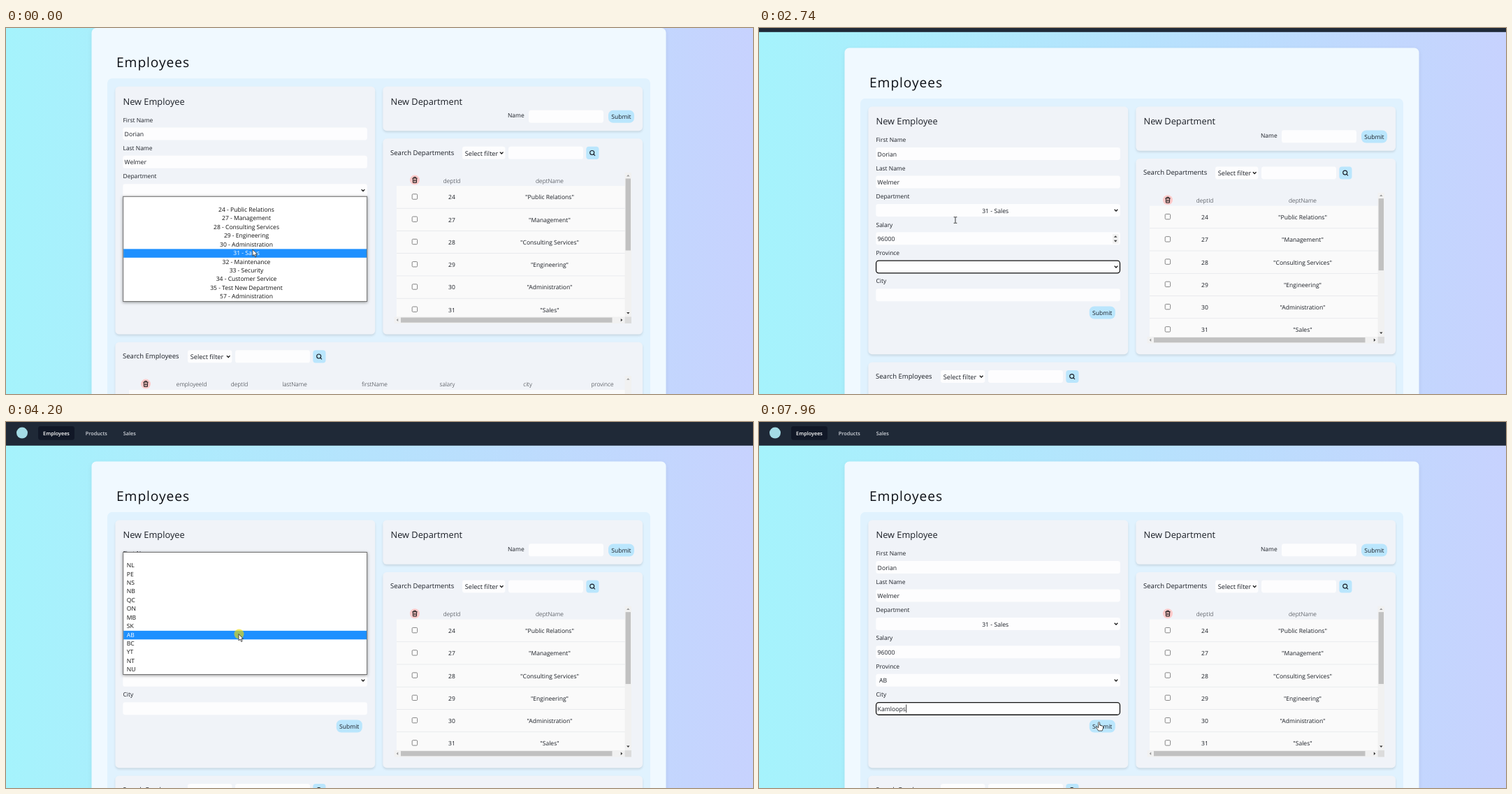
These frames come from a looping animation (1069 px wide and 524 px high, 8000 ms). An HTML page:

```html
<!DOCTYPE html>
<html lang="en">
<head>
<meta charset="utf-8">
<title>Employees</title>
<style>
html, body { margin: 0; width: 100%; height: 100%; overflow: hidden; }
svg { display: block; width: 100%; height: 100%; }
text { font: 8.45px "Open Sans", "Noto Sans", sans-serif; fill: #1b1f26; text-rendering: geometricPrecision; white-space: pre; }
.title { font-size: 19.2px; letter-spacing: .93px; fill: #0c0f14; }
.head { font-size: 12.8px; }
.search { font-size: 9.55px; }
.filter { font-size: 9.2px; }
.value { font-size: 8.7px; }
.cell { font-size: 8.55px; }
.col { font-size: 8.4px; font-weight: 300; }
.nav { font-size: 7.3px; font-weight: 600; fill: #d1d5db; }
.on { fill: #fff; }
.mid { text-anchor: middle; }
.panel { fill: #f0f3f8; filter: drop-shadow(0 2px 1.8px #0000001c); }
.box { fill: #fdfdfe; }
.btn { fill: #bae6fd; }
.popup { filter: drop-shadow(0 1.5px 2px #0006); }
.line { fill: none; stroke: #111; stroke-width: 1.3; }
</style>
</head>
<body>
<svg viewBox="0 0 1069 524">
  <defs>
    <linearGradient id="sky"><stop stop-color="#a5f3fc"/><stop offset="1" stop-color="#c7d2fe"/></linearGradient>
  </defs>
  <rect width="1069" height="524" fill="url(#sky)"/>
  <g id="page">
    <g id="base"></g>
    <g id="spin">
      <rect x="506" y="266.5" width="8.5" height="13.5" fill="#f0f0f0"/>
      <path d="M507.8 271.2l2.4-2.6 2.4 2.6zM507.8 275.2l2.4 2.6 2.4-2.6z" fill="#444"/>
    </g>
    <g id="values"></g>
    <rect id="ring" class="line" x="167.6" width="348.9" height="17.6" rx="3.8"/>
    <rect id="caret" width=".8" height="11.5" fill="#111"/>
  </g>
  <g id="depts" class="popup"></g>
  <g id="provs" class="popup"></g>
  <circle id="press" r="7" fill="#f0dc00" opacity=".64"/>
  <g id="pointer">
    <path id="arrow" d="M0 0V9.4L2.1 7.5 3.7 11 5.2 10.3 3.7 7H6.5Z" fill="#fff" stroke="#222" stroke-width=".8"/>
    <path id="beam" d="M-2.3 -4.3H-.6L0 -3.8.6 -4.3H2.3M0 -3.8V3.8M-2.3 4.3H-.6L0 3.8.6 4.3H2.3" fill="none" stroke="#222" stroke-width=".9"/>
    <path id="hand" d="M-1 .8Q0 -.6 1 .8V4.6L4.8 5.6Q6 6 6 7.4 5.8 10 4.6 12.6H-.8Q-2 10.4 -4 8.2 -4.6 6.6 -3 6.8L-1 8.4Z" fill="#fff" stroke="#222" stroke-width=".8" stroke-linejoin="round"/>
  </g>
</svg>
<script>
const LOOP = 8000, SCROLL = 56.6, ROW = 40.45, ITEM = 12.43;
const $ = id => document.getElementById(id);
const fieldY = i => 151.4 + i * ROW;

const rect = (x, y, w, h, r = 0, attrs = '') =>
  `<rect x="${x}" y="${y}" width="${w}" height="${h}" rx="${r}" ${attrs}/>`;
// y is the middle of the capitals
const text = (x, y, s, cls = '', size = 8.5) =>
  `<text x="${x}" y="${y + size * .37}" class="${cls}">${s}</text>`;
const box = (x, y, w, h = 18) => rect(x, y - h / 2, w, h, 3.4, 'class="box"');
const chevron = (x, y) => `<path class="line" d="M${x - 2.3} ${y - 1.2}l2.3 2.4 2.3-2.4"/>`;
const button = (x, y, s) => rect(x, y - 9, 37, 18, 6.8, 'class="btn"') + text(x + 18.4, y, s, 'mid cell');
const panel = (x, y, w, h) => rect(x, y, w, h, 5.6, 'class="panel"');
const triangle = (x, y, turn, fill) =>
  `<path d="M-2.2 1.2L0 -1.3 2.2 1.2Z" transform="translate(${x} ${y}) rotate(${turn})" fill="${fill}"/>`;
const trash = (x, y) => `<g transform="translate(${x} ${y})"><circle r="7" fill="#fecaca"/>
  <path d="M-3.6 -2.5H3.6M-1.4 -2.6V-4H1.4V-2.6M-2.7 -2.4L-2.4 3.9H2.4L2.7 -2.4M-.9 -.6V2.3M.9 -.6V2.3"
  fill="none" stroke="#181818" stroke-width="1"/></g>`;

function searchBar(labelX, x, y, label) {
  const inputX = x + (x > 500 ? 66 : 68);
  return text(labelX, y - .6, label, 'search', 9.5) +
    box(x, y, inputX - x - 4.6) + text(x + 3.7, y + .4, 'Select filter', 'filter', 9) +
    chevron(inputX - 9.8, y) + box(inputX, y, 107) +
    rect(inputX + 111.3, y - 9, 18.2, 18.2, 4, 'class="btn"') +
    `<g transform="translate(${inputX + 120} ${y})" fill="none" stroke="#161b22" stroke-width="1.1">
     <circle cx="-.3" cy="-.3" r="3"/><path d="M1.9 1.9L4 4"/></g>`;
}

function departmentTable() {
  const rows = [[24, 'Public Relations'], [27, 'Management'], [28, 'Consulting Services'],
    [29, 'Engineering'], [30, 'Administration'], [31, 'Sales']];
  const body = rows.map(([id, name], i) => {
    const y = 242 + i * 32.25;
    return rect(581.2, y - 4.2, 7.4, 7.4, 1.3, 'fill="#fff" stroke="#767676" stroke-width=".9"') +
      text(638, y + .3, id, 'mid cell') + text(778, y + .3, `"${name}"`, 'mid cell') +
      (i < 5 ? rect(559, y + 15.8, 327, .7, 0, 'fill="#e2e4e8"') : '');
  }).join('');
  return rect(559, 226, 327, 188, 0, 'fill="#fafafa"') +
    trash(585, 217.6) + text(638, 218.5, 'deptId', 'mid col') + text(778, 218.5, 'deptName', 'mid col') + body +
    rect(885.6, 207, 9.4, 207, 0, 'fill="#f1f1f1"') + rect(555.5, 413.5, 330, 9.4, 0, 'fill="#f1f1f1"') +
    rect(886.6, 215.5, 7.4, 103, 0, 'fill="#c1c1c1"') + rect(565, 414.5, 302.5, 7.2, 0, 'fill="#c1c1c1"') +
    rect(885.6, 413.5, 9.4, 9.4, 0, 'fill="#dcdcdc"') +
    triangle(890.3, 211.2, 0, '#999') + triangle(890.3, 408.2, 180, '#333') +
    triangle(560, 418.1, -90, '#999') + triangle(881, 418.1, 90, '#333');
}

function employeeTable() {
  const cols = { employeeId: 265.7, deptId: 334, lastName: 413, firstName: 527.5, salary: 631.5, city: 746.5, province: 853.5 };
  return trash(200, 509.6) +
    Object.entries(cols).map(([name, x]) => text(x, 510.3, name, 'mid col')).join('') +
    rect(176, 518, 710, 80, 0, 'fill="#fafafa"') + rect(885.6, 498, 9.4, 90, 0, 'fill="#f1f1f1"') +
    triangle(890.3, 502.6, 0, '#999');
}

function form() {
  const labels = ['First Name', 'Last Name', 'Department', 'Salary', 'Province', 'City'];
  return text(167.5, 104.8, 'New Employee', 'head', 12.8) +
    labels.map((s, i) => text(167.5, fieldY(i) - 20, s) + box(167.3, fieldY(i), 349.6)).join('') +
    text(169.6, fieldY(0) + .4, 'Dorian', 'value') + text(169.6, fieldY(1) + .4, 'Welmer', 'value') +
    chevron(511, fieldY(2)) + chevron(511, fieldY(4)) + button(472.8, 378.8, 'Submit');
}

$('base').innerHTML =
  rect(0, -SCROLL, 1069, 33.8, 0, 'fill="#1f2937"') +
  '<circle cx="23" cy="-41" r="8" fill="#a4dce6"/>' +
  rect(46, -50.7, 52, 19.8, 3.4, 'fill="#111827"') +
  text(72, -40.5, 'Employees', 'nav on mid', 7.3) + text(129.3, -40.5, 'Products', 'nav mid', 7.3) +
  text(176.8, -40.5, 'Sales', 'nav mid', 7.3) +
  rect(122.5, 0, 822, 700, 6.8, 'fill="#f0f9ff" style="filter:drop-shadow(0 2px 3px #0001)"') +
  text(158, 49, 'Employees', 'title', 19.2) +
  rect(145, 72.3, 777, 600, 6.8, 'fill="#e0f2fe"') +
  panel(156.4, 83.8, 371.8, 354.8) + panel(539.4, 83.8, 371.6, 63.4) +
  panel(539.4, 158.3, 371.6, 280.3) + panel(156.4, 449.8, 754.6, 200) + form() +
  text(550.5, 104.8, 'New Department', 'head', 12.8) + text(718, 125.2, 'Name') +
  box(748, 126.7, 107) + button(862, 126.8, 'Submit') +
  searchBar(550, 653, 178.8, 'Search Departments') + departmentTable() +
  searchBar(167, 260, 470.3, 'Search Employees') + employeeTable();

$('values').innerHTML = [['dept', 338.2, 2, 'mid '], ['salary', 169.6, 3, ''], ['prov', 172, 4, ''], ['city', 169.6, 5, '']]
  .map(([id, x, row, cls]) => text(x, fieldY(row) + .5, '', cls + 'value').replace('<text', `<text id="${id}"`)).join('');

function makePopup(id, top, items, x, cls) {
  const g = $(id), h = items.length * ITEM;
  g.innerHTML = rect(167.7, top - .5, 348.9, h + 1, 0, 'fill="#fff" stroke="#6f6f6f" stroke-width="1"') +
    rect(168.2, 0, 347.9, ITEM, 0, 'fill="#1e90ff"') +
    items.map((s, i) => text(x, top + (i + .5) * ITEM - .6, s, cls)).join('');
  const bar = g.querySelectorAll('rect')[1], texts = [...g.querySelectorAll('text')];
  return (open, y) => {
    g.style.display = open ? '' : 'none';
    const i = Math.floor((y - top) / ITEM), sel = i < items.length ? Math.max(0, i) : 0;
    bar.setAttribute('y', top + sel * ITEM);
    texts.forEach((el, k) => el.style.fill = k === sel ? '#fff' : '#111');
  };
}
const showDepts = makePopup('depts', 241.8, ['', '24 - Public Relations', '27 - Management',
  '28 - Consulting Services', '29 - Engineering', '30 - Administration', '31 - Sales', '32 - Maintenance',
  '33 - Security', '34 - Customer Service', '35 - Test New Department', '57 - Administration'], 344, 'mid cell');
const showProvs = makePopup('provs', 187, ['', ...'NL PE NS NB QC ON MB SK AB BC YT NT NU'.split(' ')], 172.8, 'cell');

const path = [[0, 353, 317], [240, 353, 317], [720, 281, 275], [2790, 281, 275], [2880, 321, 259],
  [3260, 330, 393], [3460, 330, 395], [3600, 332, 373], [3680, 332, 373], [4080, 333, 303.5], [4320, 333, 303.5],
  [4860, 319, 394], [5060, 319, 394], [5190, 320.5, 409], [7190, 320.5, 409], [7900, 486.5, 429.5], [LOOP, 486.5, 429.5]];
const presses = [110, 760, 3610, 4180, 5210];
const focuses = [[0, -1], [200, 2], [770, 3], [2070, 4], [3680, -1], [4270, 4], [4600, -1], [5230, 5]];
const salaryKeys = [1410, 1610, 1680, 1880, 1950];
const cityKeys = [6090, 6200, 6320, 6440, 6560, 6680, 6790, 6920];

const ease = p => p * p * (3 - 2 * p);
const clamp = p => Math.min(1, Math.max(0, p));
const typed = (s, keys, t) => s.slice(0, keys.filter(k => k <= t).length);
const show = (id, on) => $(id).style.display = on ? '' : 'none';

function pointerAt(t) {
  const i = Math.max(1, path.findIndex(p => p[0] > t));
  const [a, b] = [path[i - 1], path[i]], p = ease((t - a[0]) / (b[0] - a[0]));
  return [a[1] + (b[1] - a[1]) * p, a[2] + (b[2] - a[2]) * p];
}

function draw(t) {
  const scroll = SCROLL * ease(clamp((t - 2605) / 270));
  $('page').setAttribute('transform', `translate(0 ${scroll})`);

  $('dept').textContent = t >= 200 ? '31 - Sales' : '';
  $('salary').textContent = typed('96000', salaryKeys, t);
  $('prov').textContent = t >= 4270 ? 'AB' : '';
  $('city').textContent = typed('Kamloops', cityKeys, t);

  const [since, row] = focuses.filter(f => f[0] <= t).pop();
  show('ring', row >= 0);
  if (row >= 0) $('ring').setAttribute('y', fieldY(row) - 8.8 + .2);
  show('spin', t > 640 && t < 2810);

  const editing = row === 3 || row === 5;
  const keys = row === 3 ? salaryKeys : cityKeys;
  const last = Math.max(since, ...keys.filter(k => k <= t));
  show('caret', editing && (t - last) % 1000 < 500);
  if (editing) {
    const el = $(row === 3 ? 'salary' : 'city');
    $('caret').setAttribute('x', 170 + (el.textContent ? el.getComputedTextLength() : 0));
    $('caret').setAttribute('y', fieldY(row) - 5.7);
  }

  const [x, y] = pointerAt(t);
  showDepts(t < 200, y);
  showProvs(t >= 3680 && t < 4270, y);
  const beam = t > 640 && t < 2810 || t > 5150 && t < 7400, hand = t > 7720;
  show('beam', beam);
  show('hand', hand);
  show('arrow', !beam && !hand);
  $('pointer').setAttribute('transform', `translate(${x} ${y})`);
  show('press', presses.some(p => t >= p && t < p + 90));
  $('press').setAttribute('cx', x + .5);
  $('press').setAttribute('cy', y);
}

const start = performance.now();
function tick() {
  draw((performance.now() - start) % LOOP);
  requestAnimationFrame(tick);
}
tick();
</script>
</body>
</html>
```
